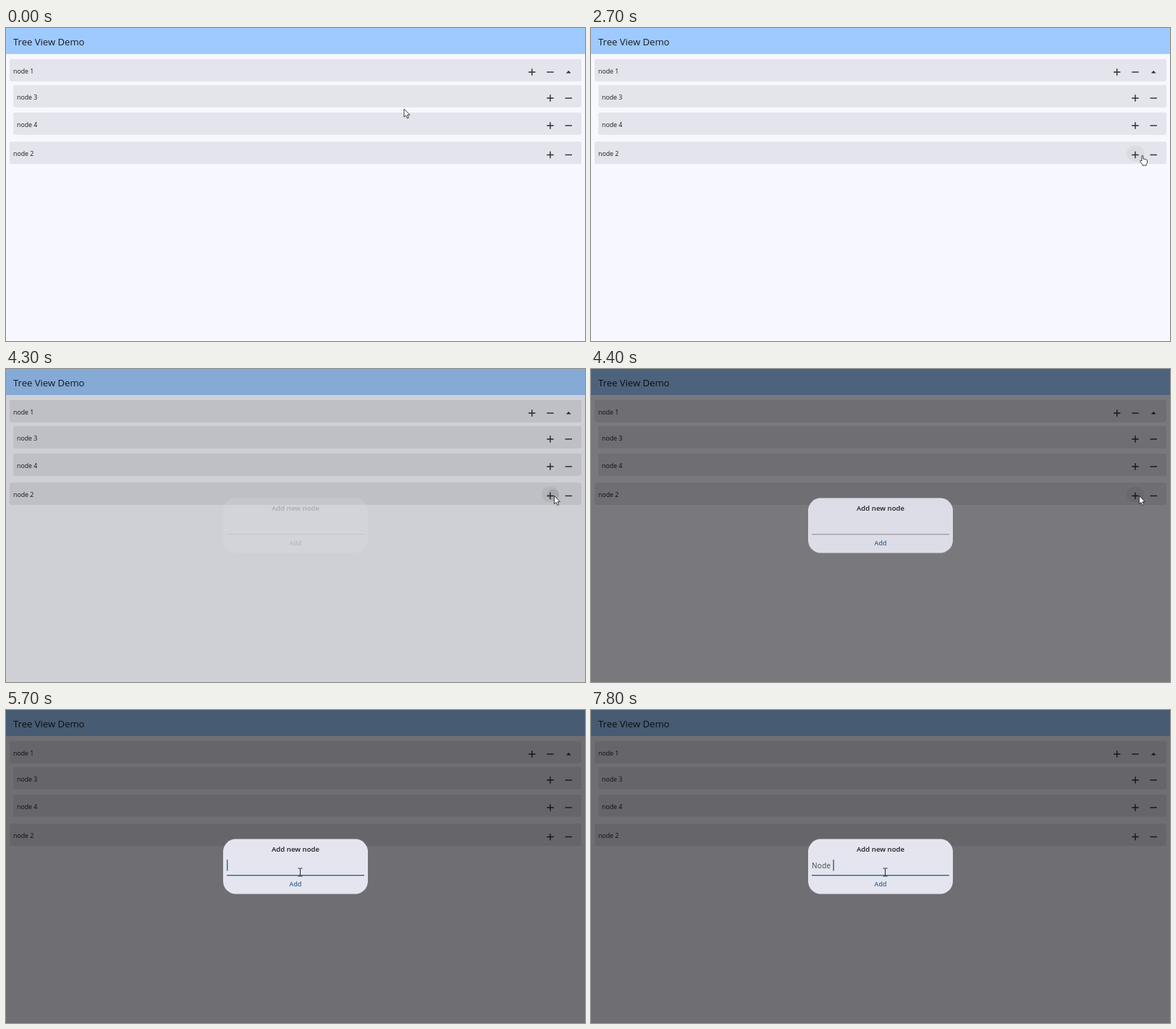
These frames come from a looping animation (800x433 px, 8000 ms). An HTML page:

```html
<!DOCTYPE html>
<html lang="en">
<head>
<meta charset="utf-8">
<title>Tree View Demo</title>
<style>
  html, body { margin: 0; width: 100%; height: 100%; overflow: hidden; background: #f7f8ff; }
  svg { display: block; width: 100%; height: 100%; }
  text { font: 8.8px "Open Sans", "Noto Sans", sans-serif; fill: #1a1c1e; white-space: pre; }
  #title { font-size: 13.1px; }
  .row rect { fill: #e4e4ec; filter: drop-shadow(0 .5px .5px rgba(0, 0, 0, .12)); }
  .icon { stroke: #2b2e33; stroke-width: 1.4; fill: none; }
  #dialog text { font-weight: 600; text-anchor: middle; }
  #dialog #heading { font-size: 9.6px; }
  #dialog #add { fill: #3b6595; }
  #dialog #typed { font-size: 10px; font-weight: 400; letter-spacing: .3px; text-anchor: start; fill: #43474e; }
  .pointer { fill: #fff; stroke: #111; stroke-width: .8; stroke-linejoin: round; }
</style>
</head>
<body>
<svg viewBox="0 0 800 433">
  <rect width="800" height="433" fill="#f7f8ff"/>
  <rect width="800" height="36" fill="#9ecaff"/>
  <text id="title" x="10" y="23.5">Tree View Demo</text>
  <g id="rows"></g>
  <ellipse id="hover" cx="752" cy="173.5" rx="12.5" ry="11"/>
  <circle id="ripple" cx="756" cy="174" r="8" opacity=".08"/>
  <g id="icons"></g>
  <rect id="scrim" width="800" height="433"/>
  <g id="dialog">
    <rect x="300" y="178.5" width="200" height="76" rx="17.5" fill="#e4e5ee"/>
    <text id="heading" x="400" y="195.5">Add new node</text>
    <text id="typed" x="305" y="219"></text>
    <rect id="caret" y="207" width="1.4" height="15.5" fill="#36618e"/>
    <rect id="underline" x="305" width="190"/>
    <text id="add" x="400" y="243.5">Add</text>
  </g>
  <path id="arrow" class="pointer" d="M0 0V11.2L2.6 8.9L4.5 13L6.3 12.1L4.5 8.2H8Z"/>
  <path id="hand" class="pointer" d="M3 8.5V1.6Q4 0 5 1.6V5.6Q9.300 5.800 10.500 7.300V10.300Q10.300 12 9.200 13V14.600H4V13.200L.6 9.200Q.5 7.500 2 7.800Z"/>
  <path id="beam" fill="none" stroke="#222" d="M-3 -5.5H-.7L0 -5L.7 -5.5H3M0 -5V5M-3 5.500H-.7L0 5L.7 5.500H3"/>
</svg>
<script>
const LOOP = 8000;
const $ = id => document.getElementById(id);

// Rows: label, left edge, top edge, whether it can collapse
const rows = [
  ['node 1', 5, 43, true],
  ['node 3', 10, 79, false],
  ['node 4', 10, 117, false],
  ['node 2', 5, 157.5, false],
];
const plus = (x, y) => `<path class="icon" d="M${x - 4.7} ${y}h9.4M${x} ${y - 4.7}v9.4"/>`;
const minus = (x, y) => `<path class="icon" d="M${x - 4.7} ${y}h9.4"/>`;
const collapse = (x, y) => `<path fill="#2b2e33" d="M${x - 3.4} ${y + 1.4}h6.8l-3.4 -3.4z"/>`;

for (const [label, x, y, open] of rows) {
  $('rows').innerHTML += `<g class="row"><rect x="${x}" y="${y}" width="${795 - x}" height="30.500" rx="3"/>
    <text x="${x + 5}" y="${y + 19.5}">${label}</text></g>`;
  const iconY = y + 18, right = open ? 752 : 777.3;
  $('icons').innerHTML += plus(right - 25.3, iconY) + minus(right, iconY) +
    (open ? collapse(777.3, iconY) : '');
}

// Timelines: each entry holds from its start time until the next one
const pointer = [
  [0, 'arrow', 550, 112], [100, 'arrow', 552, 126], [200, 'arrow', 558, 170],
  [300, 'arrow', 565, 220], [400, 'arrow', 570, 252], [500, 'arrow', 571, 264],
  [1400, 'hand', 762, 181], [1500, 'hand', 762, 178], [2200, 'hand', 758, 175.5],
  [4300, 'arrow', 757.5, 175.5], [4500, 'arrow', 650, 188], [4600, 'arrow', 530, 200],
  [4700, 'beam', 455, 212], [4800, 'beam', 428, 212], [4900, 'beam', 420, 211],
  [5200, 'beam', 420, 215], [5400, 'beam', 410, 222], [5500, 'beam', 406.5, 224.5],
];
const hover = [[0, 0], [1400, .012], [1500, .04], [4200, .05], [4500, .02], [4600, 0]];
const scrim = [[0, 0], [4300, .16], [4400, .51], [4500, .55]];
const dialog = [[0, 0], [4300, .2], [4400, .93], [4500, 1]];
const caret = [[0, 0], [5500, 1], [6300, .4], [6400, 0], [6600, 1]];
const typing = [[0, ''], [6800, 'N'], [7100, 'No'], [7200, 'Nod'], [7300, 'Node'], [7800, 'Node ']];

const at = (track, t) => track.findLast(([start]) => start <= t).slice(1);
const set = (id, attrs) => {
  for (const name in attrs) $(id).setAttribute(name, attrs[name]);
};

function draw(t) {
  const [kind, x, y] = at(pointer, t);
  for (const id of ['arrow', 'hand', 'beam']) {
    set(id, { transform: `translate(${x} ${y})`, visibility: id === kind ? 'visible' : 'hidden' });
  }
  set('hover', { opacity: at(hover, t) });
  set('ripple', { visibility: t >= 4300 && t < 4400 ? 'visible' : 'hidden' });
  set('scrim', { opacity: at(scrim, t) });
  set('dialog', { opacity: at(dialog, t) });

  const focused = t >= 5400;
  set('underline', {
    y: focused ? 228 : 228.5,
    height: focused ? 1.4 : .7,
    fill: focused ? '#36618e' : '#64676e',
  });
  const [value] = at(typing, t);
  $('typed').textContent = value;
  set('caret', {
    x: 305 + (value ? $('typed').getComputedTextLength() : 0),
    opacity: at(caret, t),
  });
}

function frame() {
  draw(performance.now() % LOOP);
  requestAnimationFrame(frame);
}
frame();
</script>
</body>
</html>
```
